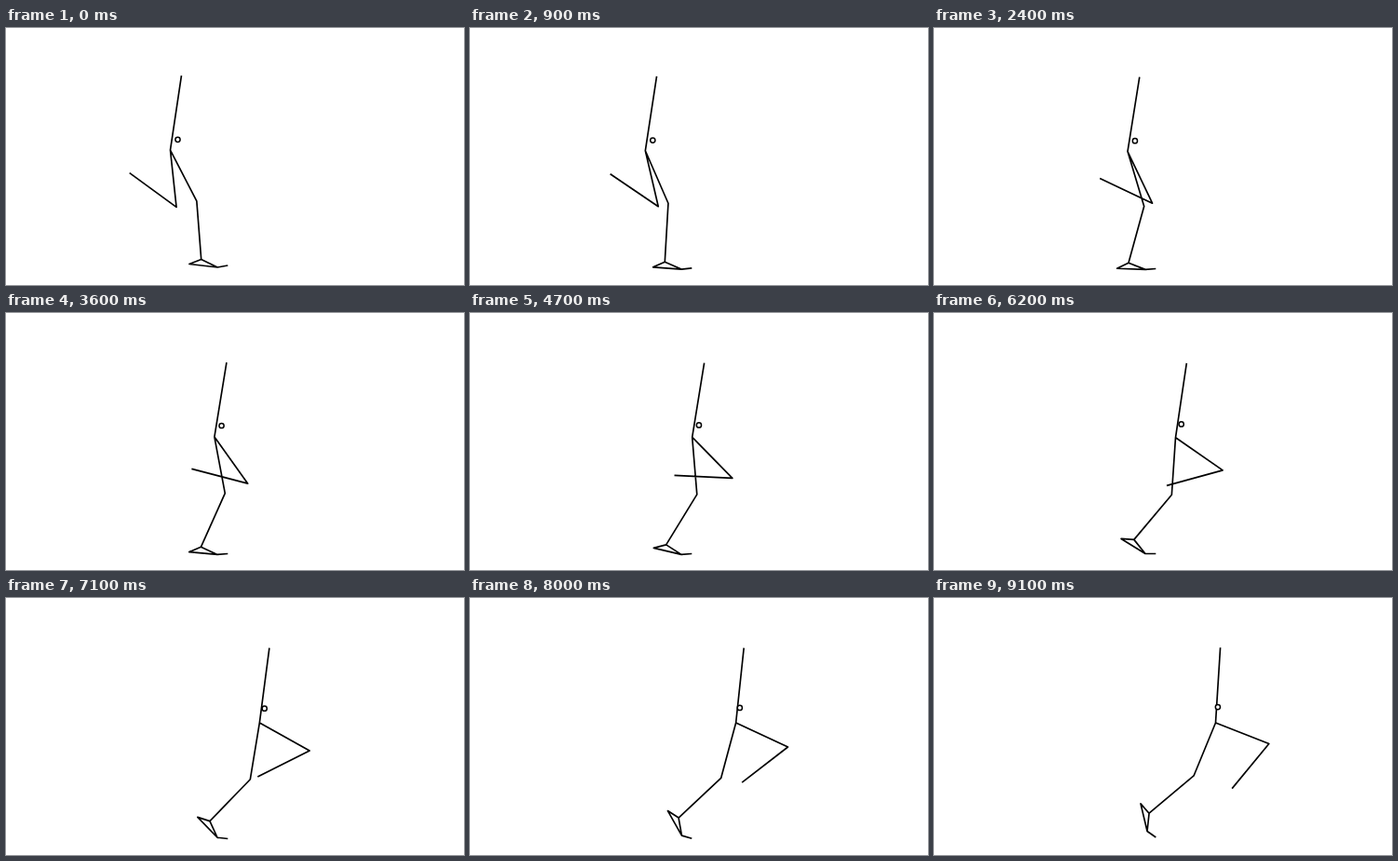
Animation of 492x276 px, one loop 9200 ms. Source, as an HTML page:

```html
<!DOCTYPE html>
<html lang="en">
<head>
<meta charset="utf-8">
<title>Walking stick figure</title>
<style>
  html, body { margin: 0; width: 100%; height: 100%; overflow: hidden; background: #fff; }
  svg { display: block; width: 492px; height: 276px; }
  path, circle { fill: none; stroke: #000; stroke-width: 1.67; stroke-linejoin: round; }
  circle { fill: #fff; stroke-width: 1.5; }
</style>
</head>
<body>
<svg viewBox="0 0 492 276">
  <path id="body"/>
  <circle id="mass" r="2.6"/>
</svg>
<script>
const LOOP = 9200, STEP = 100;
const THIGH = 61.6, SHANK = 62.4, TRUNK = 80.9, SOLE = 30.5, INSTEP = 19.4, TOES = 11.3;
const ANKLE_ANGLE = 19.4;

const body = document.getElementById("body");
const mass = document.getElementById("mass");

// Polynomial in u, lowest power first.
const poly = (u, ...terms) => terms.reduceRight((sum, k) => sum * u + k, 0);

// End of a bone; 0 degrees hangs straight down, positive swings forward.
function bone([x, y], length, degrees) {
  const a = degrees * Math.PI / 180;
  return [x + length * Math.sin(a), y + length * Math.cos(a)];
}

const line = (...points) => "M" + points.map(p => p.map(n => n.toFixed(2)).join(",")).join("L");

function draw(u) {
  // Hip travels forward; the trunk and both thighs hang from it.
  const hip = [poly(u, 176.5, 119.9, -4.3, 10.4), poly(u, 131.2, 6, -3.2)];
  const head = bone(hip, TRUNK, 180 - poly(u, 8.5, 1.3, 6.8, -13));
  const swingKnee = bone(hip, THIGH, poly(u, 6.1, 67.8, 31.7, -37));
  const swingEnd = bone(swingKnee, SHANK, poly(u, -126.2, 7.1, 145.7, -66.1));
  const knee = bone(hip, THIGH, poly(u, 27.4, -37.5, -12.3));

  // The planted foot rolls from its toe.
  const toe = [238.3, 258.5 - 3.5 * (1 - u) ** 16 - 1.5 * u ** 16];
  const ball = bone(toe, TOES, -90 - poly(u, -10, 51.9, -156.5, 149.6));
  const pitch = -90 - poly(u, 6.5, -19, -75.8, 375.9, -211);
  const heel = bone(ball, SOLE, pitch);
  const ankle = bone(ball, INSTEP, pitch - ANKLE_ANGLE);

  body.setAttribute("d",
    line(head, hip, swingKnee, swingEnd) +
    line(hip, knee, ankle, heel, ball, ankle) +
    line(ball, toe));
  mass.setAttribute("cx", hip[0] + 8 - 5.6 * u ** 3);
  mass.setAttribute("cy", hip[1] + poly(u, -11.4, 4.5, -19.6, 9.6));
}

const start = performance.now();
function tick(now) {
  const ms = Math.max(0, now - start) % LOOP;
  draw(Math.floor(ms / STEP) * STEP / (LOOP - STEP));
  requestAnimationFrame(tick);
}
draw(0);
requestAnimationFrame(tick);
</script>
</body>
</html>
```
